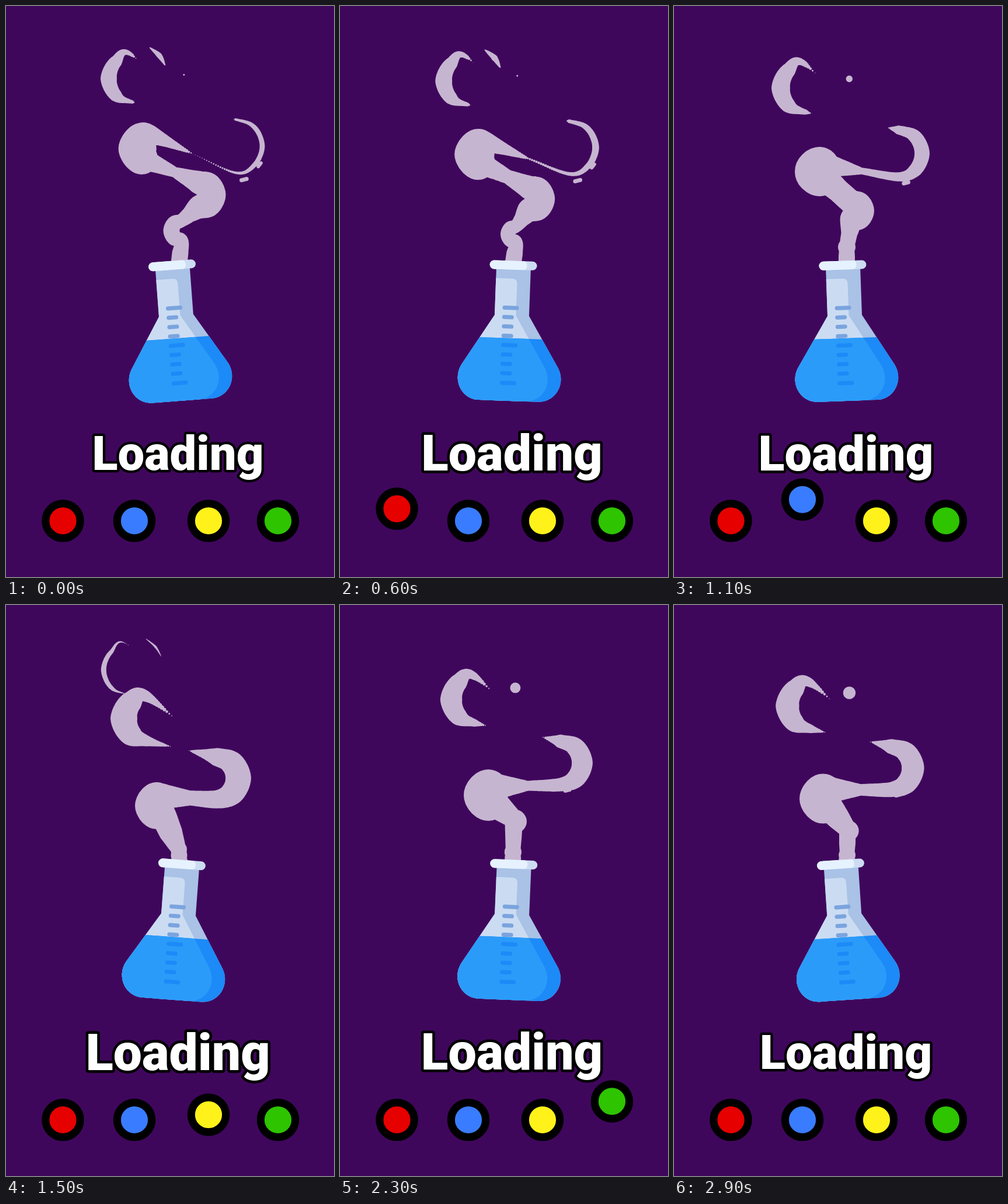
Animation of 562x976 px, one loop 3000 ms. Source, as an HTML page:

```html
<!DOCTYPE html>
<html lang="en">
<head>
<meta charset="utf-8">
<title>Loading</title>
<style>
  html, body { margin: 0; width: 100%; height: 100%; overflow: hidden; background: #3f075c; }
  svg { display: block; width: 562px; height: 976px; }
  #smoke { fill: #c6b5d0; }
  .tick { stroke-width: 7; stroke-linecap: round; }
  #label {
    font: 900 84.5px Roboto, "Noto Sans", sans-serif;
    text-anchor: middle; fill: #fff; stroke: #000; stroke-width: 9px;
    stroke-linejoin: round; paint-order: stroke;
  }
  #dots circle { stroke: #000; stroke-width: 13.2px; }
</style>
</head>
<body>
<svg viewBox="0 0 562 976">
  <defs>
    <clipPath id="liquid"><rect x="190" y="568" width="210" height="120"/></clipPath>
    <path id="body" d="M264 440H323V529L376 616C391 643 373 675 344 675H242C213 675 195 643 210 616L264 529Z"/>
    <path id="shine" d="M264 466H292Q300.500 466 300.500 475V529L353 616C368 643 352 675 321 675H242C213 675 195 643 210 616L264 529Z"/>
  </defs>

  <path id="smoke"/>

  <g id="flask">
    <use href="#body" fill="#a9c2e6"/>
    <use href="#shine" fill="#cbdcf2"/>
    <g clip-path="url(#liquid)">
      <use href="#body" fill="#1c8af7"/>
      <use href="#shine" fill="#2b9bfa"/>
    </g>
    <path class="tick" stroke="#7ba4de" d="M280.500 516h21m-21 16h13m-13 16h13m-13 16h13"/>
    <path class="tick" stroke="#1c8af7" d="M280.500 580h21m-21 16h13m-13 16h13m-13 16h13m-13 16.500h21"/>
    <rect x="252.500" y="435.500" width="81" height="15" rx="7.500" fill="#cddcf2"/>
    <path d="M260 435.500H310Q316.500 435.500 316.500 443T310 450.500H260A7.500 7.500 0 0 1 260 435.500Z" fill="#e6f2ff"/>
  </g>

  <text id="label" x="294.500" y="794">Loading</text>

  <g id="dots">
    <circle r="29.700" cx="97.500" cy="880" fill="#e60000"/>
    <circle r="29.700" cx="220" cy="880" fill="#3a7cff"/>
    <circle r="29.700" cx="347" cy="880" fill="#fff21a"/>
    <circle r="29.700" cx="466" cy="880" fill="#2ec400"/>
  </g>
</svg>
<script>
const LOOP = 3000, STEP = 100, PUFF = 650, FIRST = 200;
const $ = id => document.getElementById(id);
const dots = [...document.querySelectorAll('#dots circle')];
const mix = (a, b, k) => a + (b - a) * k;
const rad = deg => deg * Math.PI / 180;

// The smoke is a ribbon that winds left and right as it rises.
// Each bend ages along a few keys: age, centre x, centre y, bend radius, half width.
const leftBend = [
  [-450, 297, 438, 0, 14], [-200, 296, 412, 0, 15], [-50, 302, 390, 14, 13],
  [50, 300, 378, 21, 15], [200, 268, 343, 15, 32], [350, 264, 325, 14, 38],
  [450, 257, 283, 11, 39], [700, 246, 234, 26, 31], [850, 240, 194, 38, 23],
  [1100, 224, 140, 41, 16], [1300, 216, 124, 40, 14], [1600, 206, 104, 43, 0]
];
const rightBend = [
  [-450, 296, 418, 0, 14], [-300, 298, 370, 4, 18], [-200, 305, 350, 14, 24],
  [50, 337, 316, 23, 25], [200, 362, 296, 36, 22], [350, 378, 270, 37, 18],
  [450, 385, 252, 40, 13], [600, 393, 242, 45, 6], [800, 395, 232, 47, 0]
];

function bendAt(keys, age) {
  const i = keys.findIndex(k => k[0] > age);
  const [, x, y, r, w] = i < 0 ? keys[keys.length - 1]
    : keys[i - 1].map((v, j) => mix(v, keys[i][j], (age - keys[i - 1][0]) / (keys[i][0] - keys[i - 1][0])));
  return { x, y, r, w };
}

// Knots from the bottom of a bend to its top; side is -1 for left, 1 for right.
function arc({ x, y, r, w }, side, age) {
  const thin = Math.min(.85, .8 - age / 2200);
  return [90, 45, 0, -45, -90].map(deg => ({
    x: x + side * r * Math.cos(rad(deg)),
    y: y + r * Math.sin(rad(deg)),
    w: w * mix(thin, 1, Math.cos(rad(deg)))
  }));
}

const between = (a, b, w) => ({ x: (a.x + b.x) / 2, y: (a.y + b.y) / 2, w });

const disc = ({ x, y, w }) => w > .3
  ? `M${(x - w).toFixed(2)} ${y.toFixed(2)}a${w} ${w} 0 1 1 ${2 * w} 0a${w} ${w} 0 1 1 ${-2 * w} 0` : '';

// Sweep a disc along a smooth curve through the knots.
function sweep(knots, n = 20) {
  let d = '';
  for (let i = 0; i < knots.length - 1; i++) {
    const b = knots[i], c = knots[i + 1], a = knots[i - 1] || b, e = knots[i + 2] || c;
    const curve = (key, k) => b[key] + k / 2 * (c[key] - a[key]
      + k * (2 * a[key] - 5 * b[key] + 4 * c[key] - e[key] + k * (3 * (b[key] - c[key]) + e[key] - a[key])));
    for (let j = 0; j < n; j++) {
      const k = j / n;
      d += disc({ x: curve('x', k), y: curve('y', k), w: mix(b.w, c.w, k) });
    }
  }
  return d;
}

// Drops torn off the bends: three under the right one, two beside the left one.
function drops(left, right, age) {
  let d = '';
  for (let i = 0; i < 3; i++) {
    if (age < 640 - 170 * i || age > 800) continue;
    const q = rad(38 * i), r = right.r * (1 + .15 * i);
    const at = s => ({ x: right.x + r * Math.cos(q + s), y: right.y + r * Math.sin(q + s), w: 2 + i * .7 });
    d += sweep([at(-.08), at(.08)]);
  }
  const late = age - 1000;
  if (late > -80 && late < 360) {
    d += disc({ x: left.x + 70 + .063 * late, y: left.y - 20 + .045 * late, w: Math.max(1.5, 9 - .033 * late) });
  }
  if (late > 200 && late < 520) {
    const horn = [-60, -40, -22].map((deg, i) => ({
      x: left.x + 61 * Math.cos(rad(deg)),
      y: left.y + 61 * Math.sin(rad(deg)),
      w: (i % 2 ? 6 : 1) * (1 - (late - 200) / 450)
    }));
    d += sweep(horn);
  }
  return d;
}

function drawSmoke(t) {
  const phase = FIRST + ((t - FIRST) % PUFF + PUFF) % PUFF;
  const ribbon = [{ x: 296, y: 444, w: 14 }];
  let d = '', rise = 14;
  for (let age = phase - PUFF; age < 1600; age += PUFF) {
    const l = bendAt(leftBend, age), r = bendAt(rightBend, age);
    const left = arc(l, -1, age), right = arc(r, 1, age);
    const neck = Math.min(14, 18 - .027 * age);
    ribbon.push(between(ribbon[ribbon.length - 1], left[0], rise), ...left, between(left[4], right[0], neck), ...right);
    rise = Math.min(20, 9 - .06 * age);
    d += drops(l, r, age);
  }
  $('smoke').setAttribute('d', sweep(ribbon) + d);
}

// Back and forth once a second, from -1 to 1, slowing down at each end.
function swing(t) {
  const x = t % 500 / 500, k = 2 * Math.sin(x * Math.PI / 2) ** 1.15 - 1;
  return t % 1000 < 500 ? k : -k;
}

function draw(t) {
  const k = swing(t);
  drawSmoke(t);
  $('flask').setAttribute('transform', `rotate(${4.3 * k} 293 556)`);
  $('label').setAttribute('transform', `translate(294.5 770) scale(${1 + .036 * k}) translate(-294.5 -770)`);
  dots.forEach((dot, i) => {
    const off = Math.min(350, Math.abs(t - 440 - 648 * i));
    dot.setAttribute('cy', 880 - 36.5 * Math.cos(Math.PI * off / 700) ** 2);
  });
}

const start = performance.now();
let last = -1;
function tick() {
  const t = Math.floor((performance.now() - start) % LOOP / STEP) * STEP;
  if (t !== last) draw(last = t);
  requestAnimationFrame(tick);
}
tick();
</script>
</body>
</html>
```
